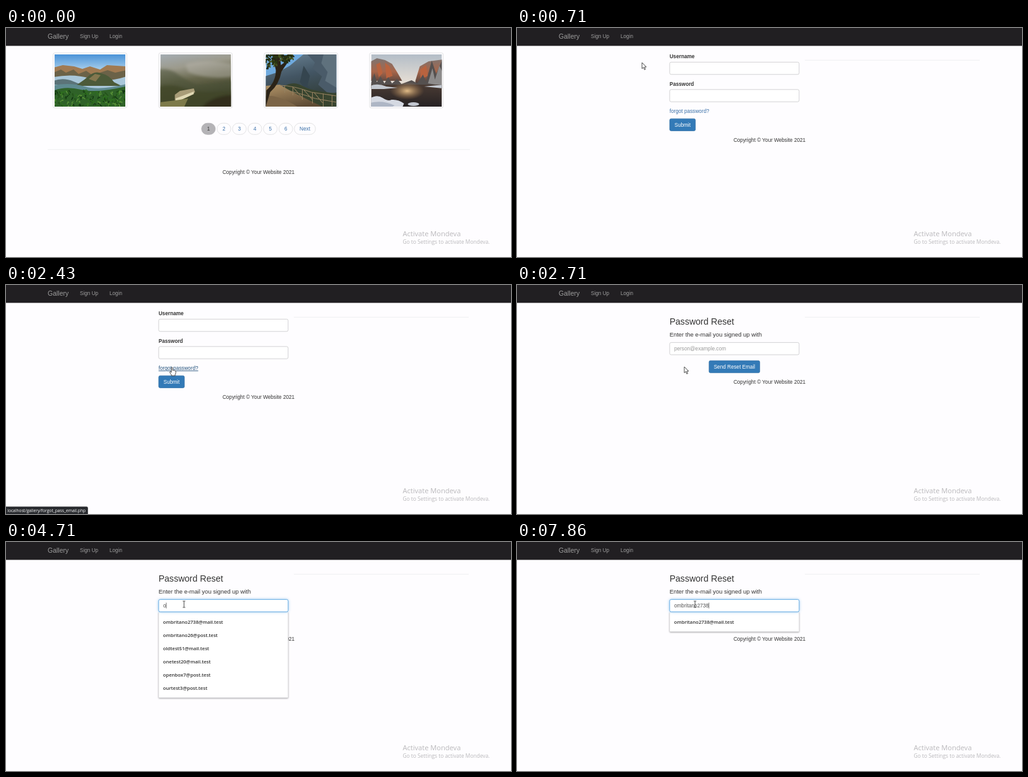
An HTML page that plays this animation: 800x364 px, repeating every 8000 ms.

```html
<!DOCTYPE html>
<html lang="en">
<head>
<meta charset="utf-8">
<title>Gallery password reset</title>
<style>
html, body { margin: 0; width: 100%; height: 100%; overflow: hidden; background: #fefdff; }
svg { display: block; }
#stage { width: 800px; height: 364px; font: 8.2px "Liberation Sans", Arial, sans-serif; fill: #333; }
.nav { fill: #9d9d9d; }
.link { fill: #3a70a8; }
.bold { font-weight: 700; }
.mid { text-anchor: middle; }
.white { fill: #fff; }
.line { stroke: #ececee; stroke-width: .8; }
.box { fill: #fff; stroke: #c8c8ca; stroke-width: .8; }
.btn { fill: #337ab7; stroke: #2e6da4; stroke-width: .7; }
.pill { fill: #fefdff; stroke: #dcdcde; stroke-width: .8; }
.ui { font-family: "Open Sans", "Noto Sans", sans-serif; }
.mark { fill: #b9b8bb; }
.row { font-size: 7.6px; font-weight: 600; }
.ink { fill: #fff; stroke: #222; stroke-width: .8; stroke-linejoin: round; }
#list { fill: #fff; stroke: #d5d5d8; stroke-width: .6; filter: drop-shadow(0 1px 1.2px #0005); }
#glow { fill: #fff; stroke: #66afe9; stroke-width: .9; filter: drop-shadow(0 0 2px #66afe9aa); }
</style>
</head>
<body>
<svg id="stage" viewBox="0 0 800 364">
  <defs>
    <linearGradient id="sky" x2="0" y2="1"><stop stop-color="#4a93d8"/><stop offset=".3" stop-color="#a9cfeb"/><stop offset="1" stop-color="#8fb0c4"/></linearGradient>
    <linearGradient id="fog" x2=".25" y2="1"><stop stop-color="#a4acb2"/><stop offset=".3" stop-color="#9c9a8c"/><stop offset=".55" stop-color="#66664c"/><stop offset="1" stop-color="#33361f"/></linearGradient>
    <linearGradient id="rock" x2=".3" y2="1"><stop stop-color="#6d8799"/><stop offset=".5" stop-color="#435563"/><stop offset="1" stop-color="#2f3a33"/></linearGradient>
    <linearGradient id="path" x2=".6" y2="1"><stop stop-color="#b29468"/><stop offset="1" stop-color="#5f4c35"/></linearGradient>
    <linearGradient id="dusk" x2="0" y2="1"><stop stop-color="#b3bdc7"/><stop offset=".6" stop-color="#ece2d6"/></linearGradient>
    <linearGradient id="cliff" x2="0" y2="1"><stop stop-color="#7d7370"/><stop offset=".5" stop-color="#a8664a"/><stop offset="1" stop-color="#4a3f3c"/></linearGradient>
    <linearGradient id="lake" x2="0" y2="1"><stop stop-color="#4a3b34"/><stop offset="1" stop-color="#262223"/></linearGradient>
    <radialGradient id="gold"><stop stop-color="#e2bd88"/><stop offset="1" stop-color="#a97b4d" stop-opacity="0"/></radialGradient>
    <filter id="soft"><feGaussianBlur stdDeviation="2"/></filter>
    <filter id="haze"><feGaussianBlur stdDeviation=".7"/></filter>
  </defs>
  <rect width="800" height="364" fill="#fefdff"/>
  <rect width="800" height="28.4" fill="#211f22"/>
  <text class="nav" x="66" y="16.6" font-size="10.5">Gallery</text>
  <text class="nav" x="117" y="16">Sign Up</text>
  <text class="nav" id="login" x="164" y="16">Login</text>

  <g id="home">
    <g id="frames"></g>
    <svg x="77" y="42" width="112" height="83">
      <rect width="112" height="83" fill="url(#sky)"/>
      <g filter="url(#haze)">
        <path d="M-2 21L13 17 31 19 44 23 56 19 72 24 83 17 114 19V40H-2Z" fill="#a07a52"/>
        <path d="M-2 29L10 24 18 29 30 24 38 31 50 26 60 33 84 25 96 29 114 25V42H-2Z" fill="#6b6248"/>
        <path d="M-2 36Q30 30 55 38T114 35V60H-2Z" fill="#a9c7da"/>
        <path d="M-2 42Q14 36 30 43L42 48H-2Z" fill="#5b7378"/>
        <path d="M32 50Q44 43 52 36 63 25 74 30 87 33 94 44L106 50Z" fill="#4c5a39"/>
        <path d="M54 39L64 31 73 33 65 43Z" fill="#85774f"/>
        <path d="M-2 49Q25 44 48 51T114 47V66H-2Z" fill="#5f8a90"/>
      </g>
      <path d="M0 57Q18 50 42 56T112 51V83H0Z" fill="#2f6228"/>
      <g id="palms" stroke-width="1.3"></g>
    </svg>
    <svg x="244.5" y="42" width="112" height="83">
      <rect width="112" height="83" fill="url(#fog)"/>
      <g filter="url(#soft)">
        <path d="M-5 24Q14 21 27 31T58 48L117 42V90H-5Z" fill="#4a5134" opacity=".55"/>
        <path d="M40 15Q70 6 117 16V35Q75 41 44 28Z" fill="#b4b1a8" opacity=".5"/>
        <path d="M-5 52Q18 45 38 54T117 57V90H-5Z" fill="#3f4626" opacity=".75"/>
        <path d="M62 90Q75 66 117 64V90Z" fill="#302d1c"/>
      </g>
      <path d="M23 64L31 58 53 54 55 60 42 68 23 75Z" fill="#a89c78"/>
      <path d="M24 70L53 59V63L25 76Z" fill="#e0d8b4"/>
      <path d="M0 76L24 73 44 70 38 83H0Z" fill="#7d7a4a"/>
    </svg>
    <svg x="411.5" y="42" width="112" height="83">
      <rect width="112" height="83" fill="#6faade"/>
      <g filter="url(#haze)">
        <path d="M20 28L38 18 50 8 62-2H114V85H-2V35Z" fill="url(#rock)"/>
        <path d="M64-2L78 13 74 22 89 35 83 48 100 63 114 60V-2Z" fill="#4a5b69"/>
        <path d="M92-2L88 14 98 28 94 42 114 54V-2Z" fill="#5f717d"/>
        <path d="M60 18L70 34 66 50 80 60 70 64 54 44Z" fill="#35454f"/>
        <path d="M27 52Q42 41 58 50T114 62V85H25Z" fill="#38442f"/>
      </g>
      <path d="M0 50L22 48Q45 62 90 83H0Z" fill="url(#path)"/>
      <path d="M0 66Q20 64 50 83H0Z" fill="#7c6547"/>
      <path d="M0 83L1 57Q16 44 16 25L10 0H22L24 17 40 5 25 27Q21 48 7 60Z" fill="#2b2318"/>
      <g id="leaves" stroke-width="2"></g>
      <path d="M22 49Q45 50 72 60L112 66M25 56Q50 60 78 70L112 76M30 49V61M43 51V65M58 55V72M74 60V78M91 62V83M105 65V82M44 53L57 68M60 56L74 72M77 61L90 77" fill="none" stroke="#94805f" stroke-width="1.1"/>
    </svg>
    <svg x="578.5" y="42" width="112" height="83">
      <rect width="112" height="83" fill="url(#dusk)"/>
      <g filter="url(#haze)">
        <path d="M-2 12L9 6 22 9 33 15 41 28 49 42H-2ZM70 42L77 19 91 11 114 8V48H70Z" fill="url(#cliff)"/>
        <path d="M8 16L14 13 18 30 12 36ZM22 13L29 19 34 34 24 38ZM78 24L87 17 90 34 78 40Z" fill="#b9633f"/>
        <path d="M-2 50L5 30 9 44 15 35 21 46 27 36 33 46 41 39 48 47 64 41 73 46 82 32 87 43 96 10 103 31 114 5V54H-2Z" fill="#55504f"/>
        <path d="M90 46L97 22 101 40 108 18 114 30V50Z" fill="#8d8b8b"/>
      </g>
      <rect y="48" width="112" height="35" fill="url(#lake)"/>
      <ellipse cx="57" cy="58" rx="27" ry="14" fill="url(#gold)"/>
      <g filter="url(#haze)">
        <path d="M-2 50Q10 45 24 51L42 53 20 55H-2ZM84 51L114 48V54Z" fill="#c3c8d0"/>
        <path d="M-2 70Q9 63 18 69T32 72Q43 71 52 78L49 85H-2Z" fill="#d5d9e2"/>
        <path d="M-2 77Q18 72 37 81L31 85H-2Z" fill="#aeb6c5"/>
        <ellipse cx="67" cy="79" rx="9" ry="3" fill="#c3c7d0"/>
      </g>
    </svg>
    <g id="pages"></g>
    <path class="line" d="M66 193.2H735"/>
  </g>

  <path class="line" id="rule" d="M456 51.2H733"/>
  <text class="mid" id="copy" x="400">Copyright © Your Website 2021</text>

  <g id="signin">
    <text class="bold" x="241.7" y="48">Username</text>
    <rect class="box" x="241.9" y="54.3" width="205" height="19.5" rx="2.3"/>
    <text class="bold" x="241.7" y="91.6">Password</text>
    <rect class="box" x="241.9" y="97.8" width="205" height="19.5" rx="2.3"/>
    <text class="link" id="forgot" x="241.7" y="135">forgot password?</text>
    <rect class="btn" x="241.9" y="144.2" width="40.7" height="19.3" rx="2.3"/>
    <text class="white mid" x="262.2" y="156.8">Submit</text>
  </g>

  <g id="reset">
    <text x="241.7" y="63.3" font-size="14.06">Password Reset</text>
    <text x="241.7" y="81.6" font-size="9.37">Enter the e-mail you signed up with</text>
    <rect class="btn" x="304.2" y="120.3" width="80.4" height="19.3" rx="2.3"/>
    <text class="white mid" x="344.4" y="132.9">Send Reset Email</text>
    <rect class="box" x="241.9" y="91.4" width="205" height="19.5" rx="2.3"/>
    <g id="drop"><rect id="list" x="241.9" y="111.3" width="205" rx="1"/><g id="rows"></g></g>
    <rect id="glow" x="241.9" y="91.4" width="205" height="19.5" rx="2.3"/>
    <text id="field" x="249" y="104"></text>
    <path id="caret" d="M0 96.5V105.5" stroke="#333" stroke-width=".7"/>
  </g>

  <g class="ui mark">
    <text x="628.5" y="331" font-size="11.1">Activate Mondeva</text>
    <text x="628.5" y="343" font-size="8.4">Go to Settings to activate Mondeva.</text>
  </g>
  <g id="status">
    <path id="bar" fill="#292b2f"/>
    <text class="ui white" id="url" x="2.2" y="361.2" font-size="6.7"></text>
  </g>
  <g id="pointer">
    <path class="ink" id="arrow" d="M0 0V9.6L2.3 7.5 3.9 11.3 5.5 10.6 3.9 7H6.9Z"/>
    <path class="ink" id="hand" d="M-1 1Q0-.5 1 1V5.2L2.4 5 3.6 5.5 4.8 5.6 6 6.6V9.4L4.9 12V13.7H-1V12.3L-3.5 8.6Q-3.8 7-2.2 7.3L-1 8.4Z"/>
    <path id="beam" d="M-2-5H-.6L0-4.5 .6-5H2M0-4.5V4.5M-2 5H-.6L0 4.5 .6 5H2" fill="none" stroke="#333" stroke-width=".9"/>
  </g>
</svg>
<script>
const $ = id => document.getElementById(id);
const show = (id, on) => { $(id).style.display = on ? "" : "none"; };
const TICK = 1000 / 7, LOOP = 8000, LAST = 55;

let seed = 7;
const rnd = () => (seed = seed * 16807 % 2147483647) / 2147483647;
const pick = list => list[Math.floor(rnd() * list.length)];

function foliage(id, count, place, colors) {
  let out = "";
  for (let i = 0; i < count; i++) {
    const [x, y] = place();
    out += `<path d="M${x} ${y}q${rnd() * 8 - 4}-4 ${rnd() * 10 - 5} ${rnd() * 4}" fill="none" stroke="${pick(colors)}"/>`;
  }
  $(id).innerHTML = out;
}
foliage("palms", 150, () => [rnd() * 112, 58 + rnd() * 26], ["#225017", "#5a9339", "#2f701f", "#123412"]);
foliage("leaves", 90, () => { const x = rnd() * 42; return [x, rnd() * (23 - x * .35)]; }, ["#283512", "#46531f", "#1f2713"]);

$("frames").innerHTML = [74.7, 242, 409, 576].map(x =>
  `<rect class="pill" x="${x}" y="39.7" width="116.6" height="87.2" rx="2.3"/>`).join("");

const pill = (label, x, w, on) =>
  `<rect class="pill" x="${x}" y="151.3" width="${w}" height="18" rx="9"${on ? ' style="fill:#b4b3b6;stroke:#b4b3b6"' : ""}/>
   <text class="mid ${on ? "" : "link"}" x="${x + w / 2}" y="163">${label}</text>`;
$("pages").innerHTML = [1, 2, 3, 4, 5, 6].map(n => pill(n, 285.3 + n * 24.5, 21.8, n === 1)).join("")
  + pill("Next", 456.7, 33.6);

const mails = ["ombritano2738@mail.test", "ombritano26@post.test", "oldtest51@mail.test",
  "onetest20@mail.test", "openbox7@post.test", "ourtest3@post.test"];
$("rows").innerHTML = mails.map((m, i) =>
  `<text class="ui row" x="248.8" y="${129.8 + i * 21}">${m}</text>`).join("");

// Ticks at which something happens
const SIGNIN = 5, HOVER = 12, LINK = 16, RESET = 19, FOCUS = 29;

// Each entry starts at a tick and holds until the next one
const moves = [
  [0, ""], [1, "hand", 172, 10], [2, "hand", 174, 12], [3, "hand", 177, 15], [4, "arrow", 185.6, 29.7],
  [5, "arrow", 198, 55], [6, "arrow", 209, 77], [7, "arrow", 219, 92], [8, "arrow", 224.5, 99.5],
  [9, "arrow", 241, 123], [10, "hand", 258, 142.5], [11, "hand", 262, 129.5], [13, "hand", 262.5, 130],
  [16, "hand", 263, 130.5], [19, "arrow", 265, 130], [20, "arrow", 270, 116],
  [21, "beam", 278, 100], [22, "beam", 282, 93.7], [24, "beam", 282, 96.5], [25, "beam", 282, 99]
];
const typing = [[0, 0], [33, 1], [35, 2], [38, 4], [39, 5], [42, 6], [43, 7], [44, 8], [46, 9],
  [49, 10], [50, 11], [54, 12], [55, 13]];
const at = (track, tick) => track.filter(k => k[0] <= tick).pop();

function render(ms) {
  // Small lead so that times rounded down to 10 ms fall in their own tick
  const tick = Math.min(LAST, Math.floor((ms + 5) / TICK));
  const page = tick < SIGNIN ? "home" : tick < RESET ? "signin" : "reset";
  for (const p of ["home", "signin", "reset"]) show(p, p === page);
  show("rule", page !== "home");
  $("copy").setAttribute("y", { home: 231.8, signin: 181.4, reset: 157.4 }[page]);
  $("login").style.fill = tick > 0 && page === "home" ? "#fff" : "";

  const hover = tick >= HOVER;
  $("forgot").style.textDecoration = hover ? "underline" : "none";
  $("forgot").style.fill = hover ? "#23527c" : "";

  const file = tick > 0 && tick < 4 ? "login" : tick >= LINK && tick < RESET ? "forgot_pass_email" : "";
  show("status", file);
  $("url").textContent = `localhost/gallery/${file}.php`;
  $("bar").setAttribute("d", `M0 352.3H${file === "login" ? 86 : 127.5}q2.3 0 2.3 2.3V364H0Z`);

  const typed = at(typing, tick)[1];
  const field = $("field");
  field.textContent = typed ? mails[0].slice(0, typed) : "person@example.com";
  field.style.fill = typed ? "#555" : "#999";
  const focused = tick >= FOCUS;
  show("glow", focused);
  $("glow").style.opacity = tick === FOCUS ? .5 : 1;
  show("caret", focused);
  const width = typed ? field.getComputedTextLength() : 0;
  $("caret").setAttribute("transform", `translate(${249.3 + width})`);

  const count = typed === 1 ? 6 : typed < 12 ? 2 : 1;
  show("drop", typed);
  $("list").setAttribute("height", 10.2 + 21 * count);
  [...$("rows").children].forEach((row, i) => { row.style.display = i < count ? "" : "none"; });

  const [, kind, x = 0, y = 0] = at(moves, tick);
  for (const k of ["arrow", "hand", "beam"]) show(k, k === kind);
  $("pointer").setAttribute("transform", `translate(${x} ${y})`);
}

const start = performance.now();
function loop() {
  render((performance.now() - start) % LOOP);
  requestAnimationFrame(loop);
}
loop();
</script>
</body>
</html>
```
